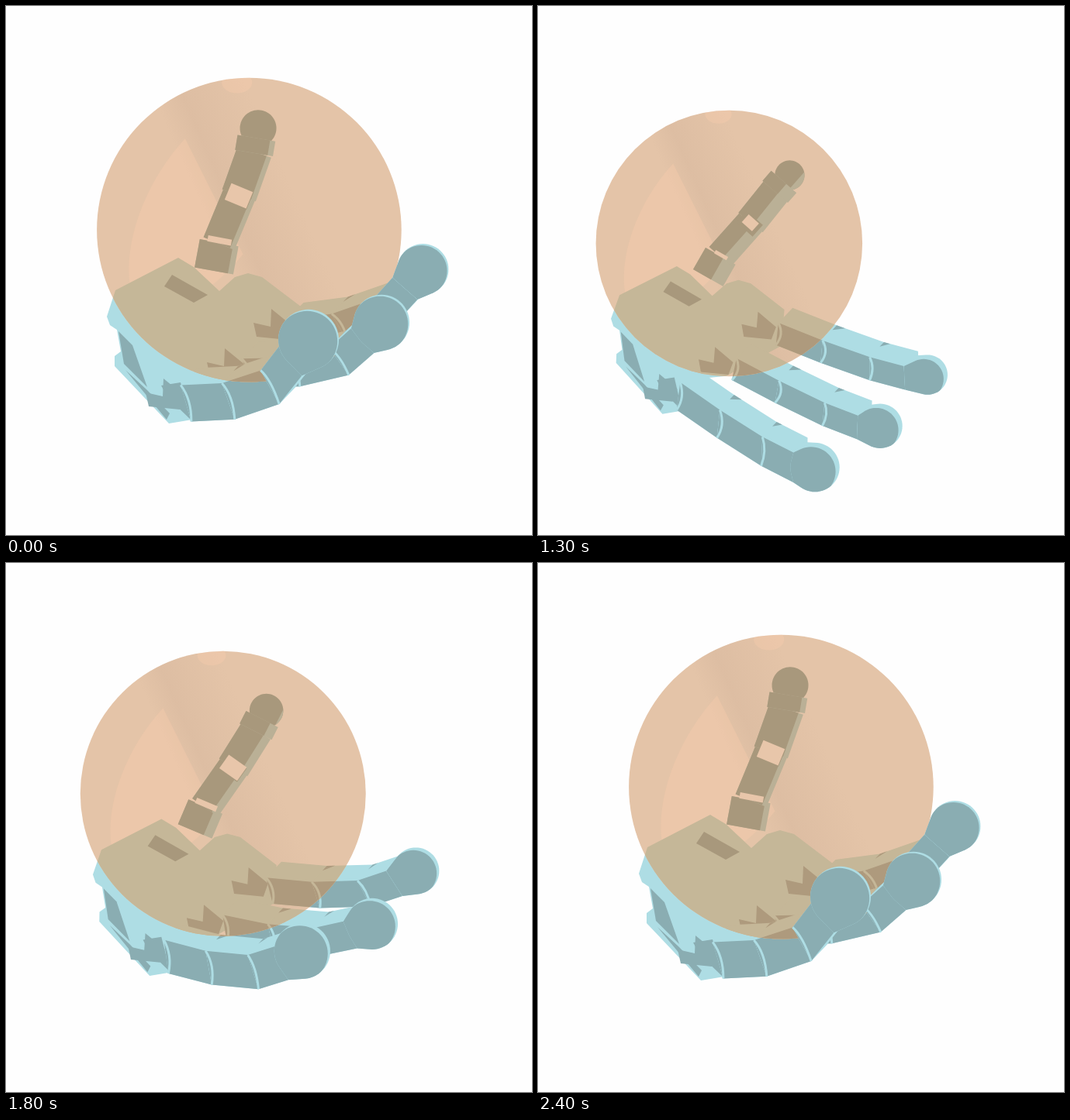
An HTML page with a canvas for the animation above (3.5 s loop, 678 px wide and 683 px high).

```html
<!DOCTYPE html>
<html lang="en">
<head>
<meta charset="utf-8">
<title>Robot hand closing on a ball</title>
<style>
html, body { margin: 0; width: 100%; height: 100%; overflow: hidden; background: #fefefe; }
canvas { display: block; }
</style>
</head>
<body>
<canvas id="stage" width="678" height="683"></canvas>
<script>
const g = document.getElementById('stage').getContext('2d');
const LOOP = 3500, RAD = Math.PI / 180;

// Hand colours in the open and seen through the ball.
const PLAIN = { light: '#aedde4', dark: '#8aadb2', deep: '#6f959b', pale: '#a0cdd4', gap: '#fefefe' };
const TINTED = { light: '#c5b798', dark: '#ae9a7d', deep: '#a8987c', pale: '#bab096', gap: '#e8c6aa' };

// Each finger bends in the plane of its projected axes: forward and up.
const FINGERS = [
  { base: [371, 423], fwd: [54, 32], up: [17, -43], r: 23 },
  { base: [311, 474], fwd: [51, 38], up: [21, -41], r: 26 },
  { base: [232, 513], fwd: [48, 47], up: [18, -52], r: 29 }
];
const BEND = [44, 54, 75, 75], LENGTH = [1, 1.08, .78, .36];
const ACROSS = [18, -19];

// Start time and curl: 0 is open, 1 is closed.
const STEPS = [[0, 1], [900, 0], [1000, .075], [1100, .15], [1200, .21], [1300, .27], [1400, .36],
  [1500, .47], [1600, .58], [1800, .71], [1900, .8], [2000, .835], [2100, .87], [2400, 1]];

const add = (a, b, k = 1) => [a[0] + b[0] * k, a[1] + b[1] * k];
const mix = (a, b, f) => [a[0] + (b[0] - a[0]) * f, a[1] + (b[1] - a[1]) * f];
const lerp = (a, b, f) => a + (b - a) * f;
const circle = (x, y, r) => Array.from({ length: 60 }, (_, i) =>
  [x + r * Math.cos(i * 6 * RAD), y + r * Math.sin(i * 6 * RAD)]);

function hull(points) {
  const sorted = [...points].sort((a, b) => a[0] - b[0] || a[1] - b[1]);
  const half = list => {
    const out = [];
    for (const p of list) {
      while (out.length > 1) {
        const [a, b] = out.slice(-2);
        if ((b[0] - a[0]) * (p[1] - a[1]) - (b[1] - a[1]) * (p[0] - a[0]) > 0) break;
        out.pop();
      }
      out.push(p);
    }
    return out.slice(0, -1);
  };
  return [...half(sorted), ...half(sorted.reverse())];
}
function trace(points) {
  g.beginPath();
  points.forEach(p => g.lineTo(p[0], p[1]));
  g.closePath();
}
function poly(color, points) {
  trace(points);
  g.fillStyle = color;
  g.fill();
}
function inside(points, draw) {
  g.save();
  trace(points);
  g.clip();
  draw();
  g.restore();
}

// Places everything for one curl value; the view zooms in as the hand closes.
function makePose(curl) {
  const near = curl ** 1.75;
  const zoom = 1 + .16 * near, scale = lerp(.88, 1, near);
  const left = lerp(90, 130, near), top = lerp(404, 401, near), skew = -.04 * (1 - near);
  const onPalm = ([x, y]) =>
    [left + scale * (x - 130) + skew * (y - 401), top + scale * (y - 401)];
  const across = [ACROSS[0] * zoom, ACROSS[1] * zoom];

  const fingers = FINGERS.map(({ base, fwd, up, r }) => {
    const dir = a => add([fwd[0] * Math.cos(a), fwd[1] * Math.cos(a)], up, Math.sin(a));
    const turn = BEND.map(b => b * curl * RAD);
    const hi = [], lo = [];
    let p = onPalm(base);
    turn.forEach((a, i) => {
      const side = dir((a + (turn[i - 1] ?? a)) / 2 + Math.PI / 2);
      hi.push(add(p, side, .29 * zoom));
      lo.push(add(p, side, -.29 * zoom));
      p = add(p, dir(a), LENGTH[i] * zoom);
    });
    return { hi, lo, across, tip: add(p, across, .5), r: r + 10 * curl, rim: .35 * (1 - .75 * curl) };
  });

  // Thumb: a chain of lengths and leans from the vertical.
  const lean = 38 - 19.5 * curl ** 3;
  const thumb = [onPalm([268, 342])];
  [[31, -8], [58, 4], [50, 1], [28, 8 - 17 * curl]].forEach(([len, off], i) => {
    const a = (lean + off) * RAD;
    thumb.push(add(thumb[i], [Math.sin(a), -Math.cos(a)], len * zoom));
  });

  return { curl, zoom, onPalm, fingers, thumb,
    ball: [lerp(238.8, 313.4, near), lerp(308.4, 289.1, near), lerp(169, 196.3, near)] };
}

function drawPalm({ onPalm }, c) {
  const shape = (color, points) => poly(color, points.map(onPalm));
  shape(c.light, [[141, 367], [130, 401], [134, 412], [143, 418], [148, 446], [140, 452], [140, 465],
    [210, 539], [240, 534], [240, 490], [300, 484], [378, 440], [380, 388], [330, 350], [312, 345],
    [295, 350], [275, 368], [242, 337], [222, 325]]);
  shape(c.dark, [[145, 420], [163, 438], [182, 492], [152, 462]]);
  shape(c.dark, [[154, 470], [182, 496], [211, 526], [207, 534]]);
  shape(c.dark, [[200, 490], [225, 486], [238, 534], [208, 505]]);
  shape(c.deep, [[214, 347], [260, 373], [242, 383], [204, 362]]);
  // Knuckle brackets
  const jag = [[-52, -14], [-30, -9], [-29, -32], [-2, -10], [-8, 8], [-48, 4]];
  FINGERS.forEach(f => shape(c.dark, jag.map(p => add(f.base, p))));
}

function drawThumb({ thumb: p, curl, zoom }, c) {
  const half = 19 * zoom, share = .5 + .36 * curl, open = Math.min(1, curl * 2.5);
  const strip = (a, b, l, r, color) => {
    const d = Math.hypot(b[0] - a[0], b[1] - a[1]);
    const n = [(b[1] - a[1]) / d * half, (a[0] - b[0]) / d * half];
    poly(color, [add(a, n, l), add(b, n, l), add(b, n, r), add(a, n, r)]);
  };
  const tip = circle(...p[4], 17.5 + 6 * curl);
  poly(c.deep, tip);
  inside(tip, () => strip(p[3], add(p[4], add(p[4], p[3], -1)), .6 - 2 * share, -2, c.pale));
  [1.15, .98, 1.04, 1.12].forEach((k, i) => {
    const end = mix(p[i], p[i + 1], i < 3 ? 1.03 : .6);
    strip(p[i], end, k, -k, c.pale);
    strip(p[i], end, k, k * (1 - 2 * share), c.deep);
  });
  const hole = (i, from, to, w, color) =>
    strip(mix(p[i], p[i + 1], from), mix(p[i], p[i + 1], to), w, -w, color);
  hole(1, .8, 1.14, .72, c.deep);
  hole(1, 1 - .18 * open, 1 + .16 * open, .68 * open, c.gap);
  hole(0, 1, 1 + .22 * open, .7 * open, c.gap);
}

function drawSegment({ hi, lo, across }, i, c) {
  const face = [hi[i], hi[i + 1], lo[i + 1], lo[i]];
  const back = face.map(p => add(p, across));
  poly(c.light, hull([...face, ...back]));
  poly(c.dark, face);
  if (i) poly(c.dark, [back[0], mix(back[0], back[1], .18), mix(back[0], hi[i], .3)]);
  // Curved joint seam
  const bulge = add(mix(hi[i], lo[i], .4), add(hi[i + 1], hi[i], -1), .16);
  g.beginPath();
  g.moveTo(...hi[i]);
  g.quadraticCurveTo(...bulge, ...lo[i]);
  g.strokeStyle = c.light;
  g.lineWidth = 3;
  g.stroke();
}

function drawTip({ hi, lo, across, tip, r, rim }, c) {
  const end = [hi[3], lo[3]];
  const whole = hull([...end, add(hi[3], across, .7), ...circle(...tip, r)]);
  poly(c.light, whole);
  inside(whole, () => poly(c.dark, hull([...end, ...circle(...add(tip, across, -rim), r)])));
}

function drawHand(pose, c) {
  drawPalm(pose, c);
  drawThumb(pose, c);
  pose.fingers.forEach(f => [0, 1].forEach(i => drawSegment(f, i, c)));
}

function drawBall(x, y, r) {
  g.save();
  g.translate(x, y);
  g.scale(r, r);
  g.fillStyle = '#e4c4a8';
  g.fillRect(-1.1, -1.1, 2.2, 2.2);
  const band = g.createLinearGradient(-.2, .09, .34, -.15);
  band.addColorStop(0, 'rgba(190,160,138,0)');
  band.addColorStop(.3, 'rgba(190,160,138,.18)');
  band.addColorStop(1, 'rgba(190,160,138,0)');
  g.fillStyle = band;
  g.fillRect(-1, -1, 2, 2);
  g.fillStyle = 'rgba(248,204,172,.35)';
  g.beginPath();
  g.moveTo(-.42, -.6);
  g.bezierCurveTo(-.7, -.3, -.86, .16, -.76, .46);
  g.quadraticCurveTo(-.4, .6, -.04, .16);
  g.fill();
  g.beginPath();
  g.ellipse(-.08, -.97, .1, .07, 0, 0, 7);
  g.fill();
  g.restore();
}

function render(pose) {
  g.fillStyle = PLAIN.gap;
  g.fillRect(0, 0, 678, 683);
  inside([[0, 0], [678, 0], [678, 677], [0, 677]], () => {
    drawHand(pose, PLAIN);
    g.save();
    g.beginPath();
    g.arc(...pose.ball, 0, 7);
    g.clip();
    drawBall(...pose.ball);
    drawHand(pose, TINTED);
    g.restore();
    pose.fingers.forEach(f => {
      drawSegment(f, 2, PLAIN);
      drawTip(f, PLAIN);
    });
  });
}

const start = performance.now();
let shown = -1;
function tick(now) {
  const time = Math.max(0, now - start) % LOOP;
  const curl = STEPS.filter(s => s[0] <= time).pop()[1];
  if (curl !== shown) render(makePose(shown = curl));
  requestAnimationFrame(tick);
}
tick(start);
</script>
</body>
</html>
```
